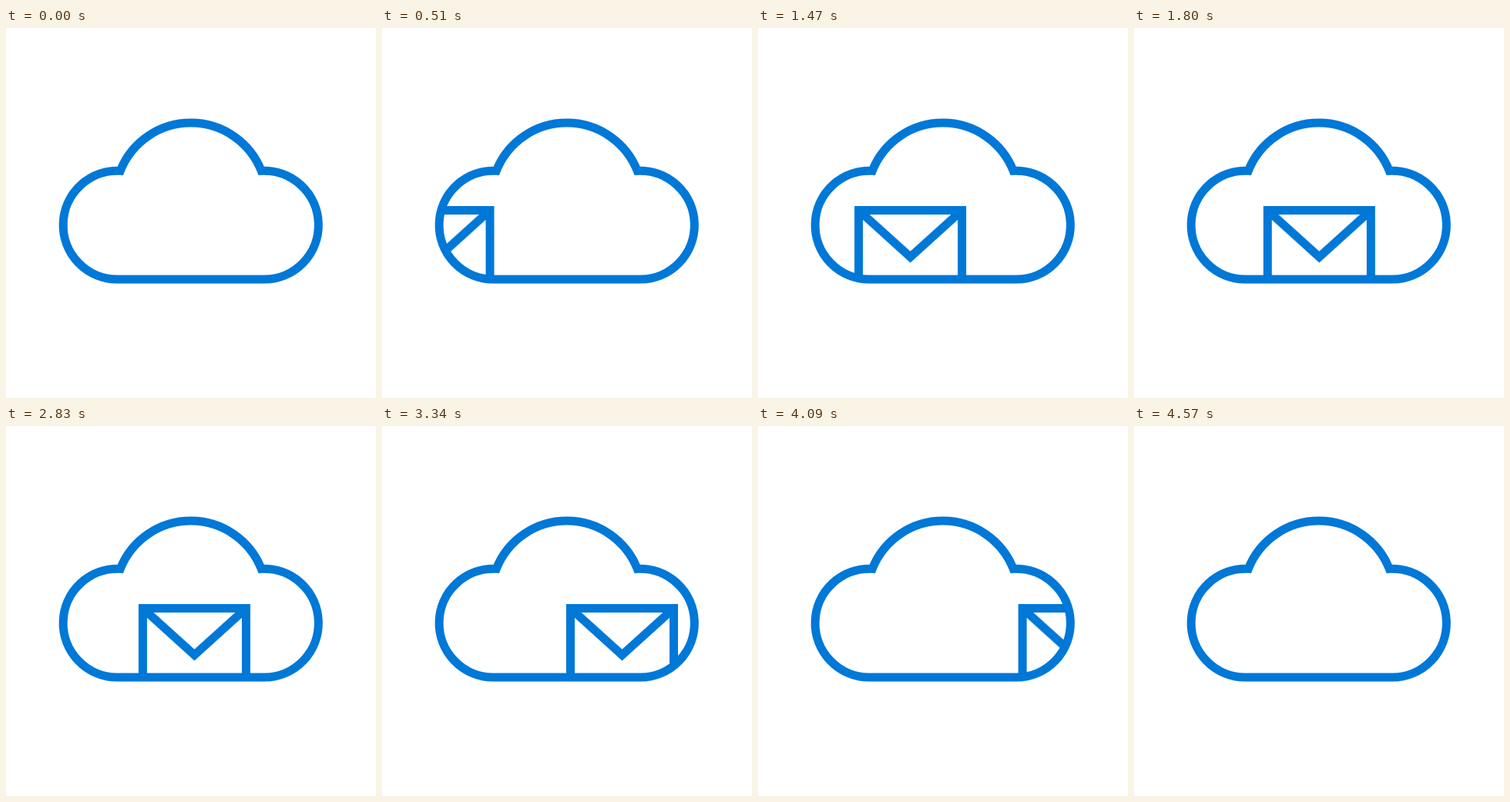
These frames come from a looping animation (480x480 px, 4.6 s). An HTML page:

```html
<!DOCTYPE html>
<html lang="en">
<head>
<meta charset="utf-8">
<title>Mail passing through a cloud</title>
<style>
  html, body { margin: 0; width: 100%; height: 100%; overflow: hidden; background: #fff; }
  svg { display: block; width: 100vw; height: 100vh; }
  .line { fill: none; stroke: #0078d7; stroke-width: 11; stroke-miterlimit: 10; }
  .mail { animation: drift 4600ms linear infinite; }

  /* Drift in, rest for a second, drift out */
  @keyframes drift {
    0% { transform: translateX(-65.8px); }
    39.1304%, 60.8696% { transform: translateX(167.8px); }
    100% { transform: translateX(404.5px); }
  }
</style>
</head>
<body>
<svg viewBox="0 0 480 480">
  <defs>
    <path id="cloud" d="M144.3 326 A70.4 70.4 0 1 1 148.3 185.3 A98.3 98.3 0 0 1 331.2 185.3 A70.4 70.4 0 1 1 335.2 326 Z"/>
    <clipPath id="inside"><use href="#cloud"/></clipPath>
  </defs>
  <g clip-path="url(#inside)">
    <g class="mail line">
      <path d="M5.5 340 V236.5 H139.5 V340"/>
      <path d="M5.5 236.5 L72.5 297 L139.5 236.5"/>
    </g>
  </g>
  <use href="#cloud" class="line"/>
</svg>
</body>
</html>
```
